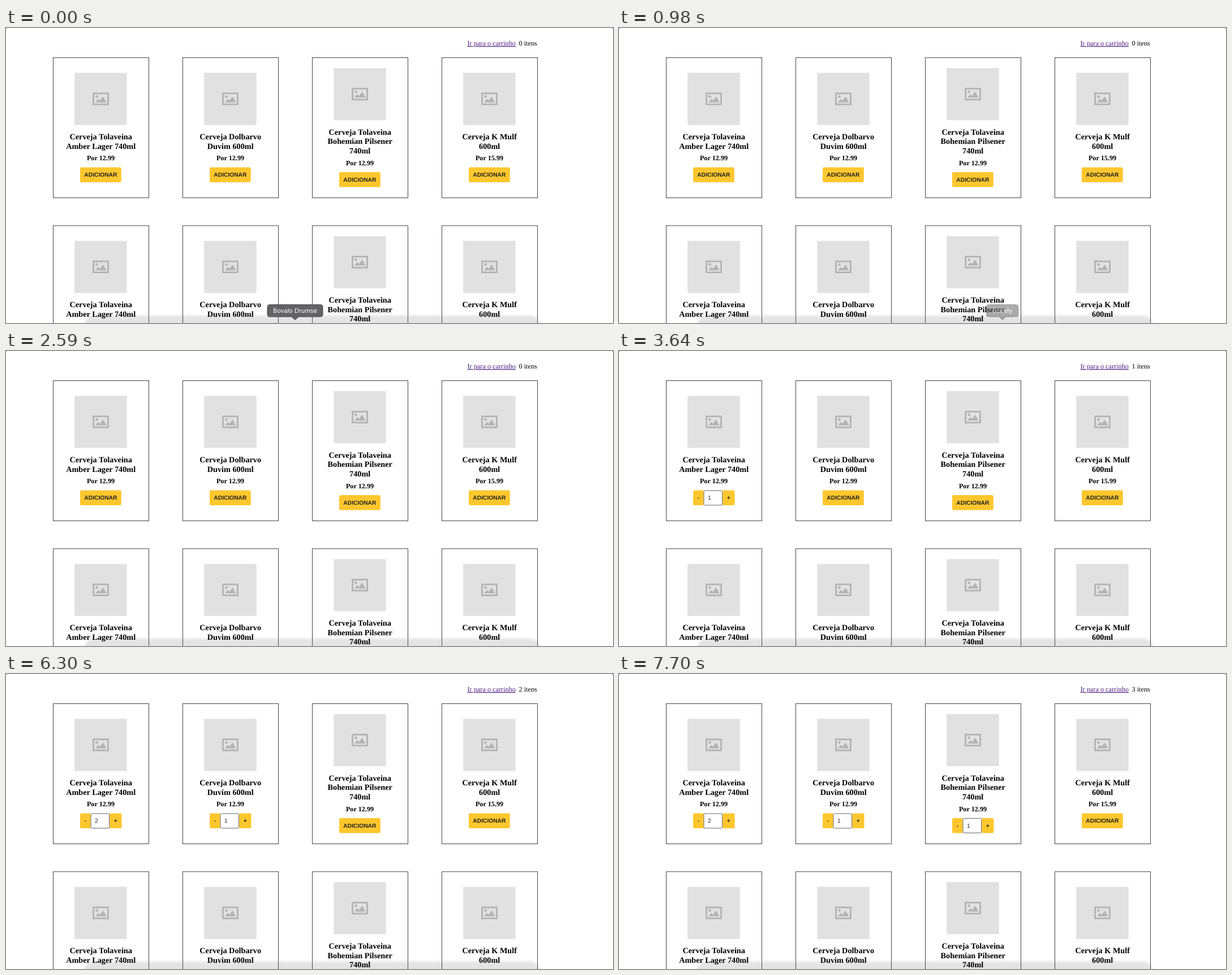
Recreate the animation shown at these times as an HTML page. Size 1073 px wide and 522 px high, loop 8 s.

```html
<!DOCTYPE html>
<html lang="pt-BR">
<head>
<meta charset="utf-8">
<title>Loja</title>
<style>
html, body { margin: 0; width: 100%; height: 100%; overflow: hidden; background: #fff; }
svg { display: block; width: 1073px; height: 522px; }
text { text-rendering: geometricPrecision; fill: #000; }
.mid { text-anchor: middle; }
.top, .title, .price { font-family: "Liberation Serif", "Times New Roman", serif; }
.top { font-size: 12.27px; }
.title { font-size: 14.25px; font-weight: 700; }
.price { font-size: 12.2px; font-weight: 700; }
.link { fill: #4b1c80; text-decoration: underline; }
.btn, .qty { font-family: "Liberation Sans", Arial, sans-serif; font-size: 10.25px; fill: #222; }
.btn { font-weight: 700; }
.tip text { font: 10.9px Inter, "Liberation Sans", sans-serif; fill: #fff; }

.anim { animation: 8s step-end infinite; }
.tip1 { animation-name: tip1; }
.tip2 { animation-name: tip2; }
.tip3 { animation-name: tip3; }
.zero { animation-name: zero; }
.one { animation-name: one; }
.two { animation-name: two; }
.first { animation-name: first; }
.second { animation-name: second; }
.third { animation-name: third; }
.qty1 { animation-name: qty1; }
.qty2 { animation-name: qty2; }
@keyframes tip1 { 0% { opacity: 1 } 3.5%, to { opacity: 0 } }
@keyframes tip2 { 0% { opacity: 0 } 3.5% { opacity: 1 } 6.125%, to { opacity: 0 } }
@keyframes tip3 {
  0% { opacity: 0 } 6.125% { opacity: 1 } 10.5% { opacity: .88 } 11.375% { opacity: .72 }
  12.25% { opacity: .53 } 13.125% { opacity: .25 } 14%, to { opacity: 0 }
}
@keyframes zero { 0% { opacity: 1 } 45.5%, to { opacity: 0 } }
@keyframes one { 0% { opacity: 0 } 45.5% { opacity: 1 } 78.75%, to { opacity: 0 } }
@keyframes two { 0% { opacity: 0 } 78.75% { opacity: 1 } 91.875%, to { opacity: 0 } }
@keyframes first { 0% { opacity: 0 } 45.5%, to { opacity: 1 } }
@keyframes second { 0% { opacity: 0 } 78.75%, to { opacity: 1 } }
@keyframes third { 0% { opacity: 0 } 91.875%, to { opacity: 1 } }
@keyframes qty1 { 0% { opacity: 1 } 57.75%, to { opacity: 0 } }
@keyframes qty2 { 0% { opacity: 0 } 57.75%, to { opacity: 1 } }
</style>
</head>
<body>
<svg id="stage" viewBox="0 0 1073 522"></svg>
<script>
const products = [
  { lines: ["Cerveja Tolaveina", "Amber Lager 740ml"], price: "12.99", step: "first" },
  { lines: ["Cerveja Dolbarvo", "Duvim 600ml"], price: "12.99", step: "second" },
  { lines: ["Cerveja Tolaveina", "Bohemian Pilsener", "740ml"], price: "12.99", step: "third" },
  { lines: ["Cerveja K Mulf", "600ml"], price: "15.99" }
];

const text = (cls, x, y, s) => `<text class="${cls}" x="${x}" y="${y}">${s}</text>`;
const box = (x, y, w, h, attrs) => `<rect x="${x}" y="${y}" width="${w}" height="${h}" ${attrs}/>`;
const yellow = 'rx="2.5" fill="#ffc72e"';

const picture = y => box(38.2, y, 92.5, 92.2, 'fill="#e1e1e1"') +
  `<g transform="translate(84.5 ${y + 46})" fill="#b3b3b3">
    <rect x="-13" y="-9.7" width="26" height="19.4" fill="none" stroke="#b3b3b3" stroke-width="2.8"/>
    <circle cx="-7" cy="-4.2" r="2.3"/>
    <path d="M-9.5 6 -4.5 0 -1.3 3.2 4-4.2 10 6z"/>
  </g>`;

function stepper(y, name) {
  const digits = name === "first"
    ? text("qty anim qty1", 73.9, y + 16.9, 1) + text("qty anim qty2", 73.9, y + 16.9, 2)
    : text("qty", 73.9, y + 16.9, 1);
  return `<g class="anim ${name}">` + box(47, y - 1, 75, 28.5, 'fill="#fff"') +
    box(48, y, 18.6, 26.6, yellow) + box(100.2, y, 21.3, 26.6, yellow) +
    box(67, y + .5, 32.6, 25.8, 'rx="1.5" fill="#fff" stroke="#666"') +
    text("btn mid", 57.4, y + 16.9, "-") + text("btn mid", 110.7, y + 16.9, "+") +
    digits + "</g>";
}

function card({ lines, price, step }, x, y, row) {
  const tall = lines.length > 2 ? 8.4 : 0;
  const by = 194.5 + tall;
  return `<g transform="translate(${x} ${y})">` +
    box(.5, .5, 169, 248, 'fill="none" stroke="#444"') + picture(27.4 - tall) +
    lines.map((s, i) => text("title mid", 84.7, 144.9 - tall + i * 16.75, s)).join("") +
    text("price mid", 84.5, 182.4 + tall, "Por " + price) +
    box(48, by, 72.8, 26.6, yellow) + text("btn mid", 84.4, by + 16.9, "ADICIONAR") +
    (step && row === 0 ? stepper(by, step) : "") + "</g>";
}

// Tooltip with a small pointer, centred on cx
function tip(n, cx, w, label) {
  const l = cx - w / 2 + .5, r = cx + w / 2 - .5;
  return `<g class="tip anim tip${n}">
    <path d="M${l + 4} 489.5H${r - 4}q4 0 4 4V507q0 4-4 4H${cx + 6}l-5 4.7q-1 .8-2 0l-5-4.7H${l + 4}q-4 0-4-4V493.5q0-4 4-4z"
      fill="#636365" stroke="#4c4c4e"/>` + text("mid", cx, 503.6, label) + "</g>";
}

const counts = ["zero", "one", "two", "third"]
  .map((c, i) => text("top anim " + c, 906.5, 31, i)).join("");

const cards = [0, 1].map(row =>
  products.map((p, col) => card(p, 83 + col * 229, 52 + row * 297.3, row)).join("")).join("");

document.getElementById("stage").innerHTML =
  '<defs><filter id="soft" x="-5%" y="-40%" width="110%" height="180%"><feGaussianBlur stdDeviation="2"/></filter></defs>' +
  '<path d="M0 0h3q-3 0-3 3zM1073 0h-3q3 0 3 3z" fill="#888"/>' +
  box(138, 508.5, 806, 50, 'rx="18" fill="#000" opacity=".1" filter="url(#soft)"') +
  text("top link", 815.5, 31, "Ir para o carrinho") + counts +
  text("top", 915.7, 31, "itens") + cards +
  tip(1, 511, 99, "Bovalo Drumse") + tip(2, 579, 64, "Arquivos") + tip(3, 677.7, 57.5, "Sobtily");
</script>
</body>
</html>
```
